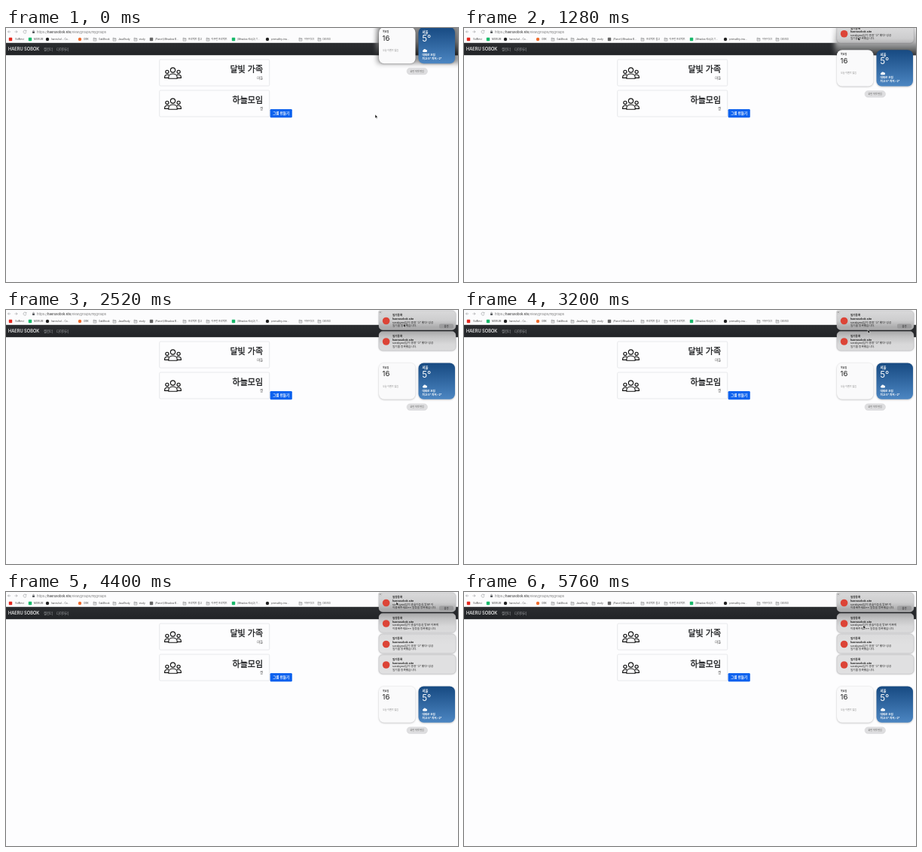
Write an HTML page that moves like this. It is 600 px wide and 338 px high and loops after 5.8 s.

```html
<!DOCTYPE html>
<html lang="ko">
<head>
<meta charset="utf-8">
<style>
html, body { margin: 0; width: 100%; height: 100%; overflow: hidden; background: #fdfdfe; }
svg { display: block; width: 100%; height: 100%; font-family: Inter, "Noto Sans CJK KR", "Noto Sans CJK", sans-serif; }
text { white-space: pre; }
</style>
</head>
<body>
<svg id="stage" viewBox="0 0 600 338" xmlns="http://www.w3.org/2000/svg">
  <defs>
    <linearGradient id="sky" x2="0" y2="1">
      <stop stop-color="#174a82"/><stop offset="1" stop-color="#4c86c2"/>
    </linearGradient>
    <linearGradient id="nav" x2="0" y2="1">
      <stop stop-color="#2b2d30"/><stop offset="1" stop-color="#222427"/>
    </linearGradient>
    <!-- what the frosted glass lets through, by height on the page -->
    <linearGradient id="glass" gradientUnits="userSpaceOnUse" x1="0" y1="0" x2="0" y2="70">
      <stop stop-color="#dadadb"/><stop offset=".2" stop-color="#cdcdce"/>
      <stop offset=".32" stop-color="#adadae"/><stop offset=".41" stop-color="#a8a8a9"/>
      <stop offset=".51" stop-color="#c3c3c4"/><stop offset=".65" stop-color="#d8d8d9"/>
      <stop offset="1" stop-color="#e0e0e1"/>
    </linearGradient>
    <!-- blurred column behind the panel while it moves -->
    <linearGradient id="veil" gradientUnits="userSpaceOnUse" x1="0" y1="0" x2="0" y2="36">
      <stop stop-color="#e6e6e7"/><stop offset=".5" stop-color="#b4b4b5"/>
      <stop offset=".75" stop-color="#777879"/><stop offset="1" stop-color="#37383a"/>
    </linearGradient>
    <filter id="soft" x="-30%" y="-30%" width="160%" height="160%"><feGaussianBlur stdDeviation="3.5"/></filter>
    <filter id="sides" x="-20%" y="0" width="140%" height="100%"><feGaussianBlur stdDeviation="3 0"/></filter>
    <filter id="faint" x="-20%" y="-20%" width="140%" height="140%"><feGaussianBlur stdDeviation="1.2"/></filter>
    <g id="people" fill="none" stroke="#111" stroke-width="1.15" stroke-linejoin="round" stroke-linecap="round">
      <circle cx="11.5" cy="4" r="3.1"/>
      <path d="M5.8 15.2v-1.7c0-6 11.4-6 11.4 0v1.7z"/>
      <circle cx="3.9" cy="6.3" r="2.1"/><circle cx="19.1" cy="6.3" r="2.1"/>
      <path d="M5.6 14.4H.6v-1.2c0-2.7 3-3.8 5.4-2.8M17.4 14.4h5v-1.2c0-2.7-3-3.8-5.4-2.8"/>
    </g>
  </defs>
</svg>
<script>
const LOOP = 5800;
const stage = document.getElementById('stage');

function add(parent, tag, attrs = {}, content) {
  const el = document.createElementNS('http://www.w3.org/2000/svg', tag);
  for (const key in attrs) el.setAttribute(key, attrs[key]);
  if (content !== undefined) el.textContent = content;
  parent.append(el);
  return el;
}
const rect = (p, x, y, width, height, fill, more) => add(p, 'rect', { x, y, width, height, fill, ...more });
const text = (p, x, y, size, str, fill = '#222', more) =>
  add(p, 'text', { x, y, 'font-size': size, fill, ...more }, str);
const bold = { 'font-weight': 700 }, end = { 'text-anchor': 'end' }, middle = { 'text-anchor': 'middle' };
const move = (el, x, y) => el.setAttribute('transform', `translate(${x} ${y})`);

function buildBrowser() {
  rect(stage, 0, 0, 600, 20, '#fcfcfd');
  add(stage, 'path', {
    d: 'M6.2 5H2.6M4 3.4 2.5 5 4 6.6M11.5 5H15M13.6 3.4 15.1 5l-1.5 1.6M26.6 3.8A2 2 0 1 0 27 5.5M27 2.9v1.3h-1.3',
    fill: 'none', stroke: '#8b8d91', 'stroke-width': .55
  });
  rect(stage, 35, 4.5, 3, 2.5, '#55585c', { rx: .4 });
  add(stage, 'path', { d: 'M35.7 4.6v-.7a.8.8 0 0 1 1.6 0v.7', fill: 'none', stroke: '#55585c', 'stroke-width': .45 });
  const url = text(stage, 41, 6.6, 4.15, '', '#777');
  add(url, 'tspan', {}, 'https://');
  add(url, 'tspan', { fill: '#222' }, 'haerusobok.site');
  add(url, 'tspan', {}, '/view/groups/mygroups');

  // icon x, label x, label, icon colour (none: folder), round icon
  const bookmarks = [
    [6, 12, 'VidNest', '#e5281f'], [32, 37, 'MORUM', '#19b96b'],
    [55, 60, 'haneulsol - Co...', '#222', 1], [98, 103, 'OBK', '#ef6c2e', 1],
    [118, 123, 'OakBrook'], [144, 149, 'JavaStudy'], [172, 176.5, 'study'],
    [193, 198, '[Parcel] Meadow B...', '#666'], [237, 242, '프로젝트 참고'],
    [268, 272.5, '아무런 프로젝트'], [302, 307, '[Meadow Kit][2] T...', '#19b96b'],
    [347, 352, 'pinevalley-tea...', '#222', 1], [391, 396, '아무거나1'], [416, 420.5, 'DEV03']
  ];
  for (const [ix, tx, label, color, round] of bookmarks) {
    if (!color) add(stage, 'path', {
      d: `M${ix - 2} 13h1.6l.6.7h1.8v3.5h-4zM${ix - 2} 14.5h4`,
      fill: '#e4e5e7', stroke: '#777', 'stroke-width': .4
    });
    else rect(stage, ix - 2.2, 12.8, 4.4, 4.4, color, { rx: round ? 2.2 : .7 });
    text(stage, tx, 16.2, 3.15, label, '#444');
  }
}

function buildPage() {
  rect(stage, 0, 19.8, 600, 16.4, 'url(#nav)');
  text(stage, 3, 30.2, 5.7, 'HAERU SOBOK', '#fff', { 'font-weight': 500 });
  text(stage, 50, 29.8, 4.4, '캘린더', '#a3a5a8');
  text(stage, 67, 29.8, 4.4, '다이어리', '#a3a5a8');

  [[42, '달빛 가족', '마들'], [83, '하늘모임', '짱']].forEach(([y, title, sub]) => {
    rect(stage, 203.7, y, 146, 35, '#fdfdfe', { rx: 1.4, stroke: '#d9dadd', 'stroke-width': .6 });
    add(stage, 'use', { href: '#people', transform: `translate(210 ${y + 10})` });
    text(stage, 341, y + 17.2, 11, title, '#1c1e20', { ...end, stroke: '#1c1e20', 'stroke-width': .3 });
    text(stage, 341, y + 25.8, 4.2, sub, '#444', end);
  });
  rect(stage, 350.6, 107.9, 29.2, 11.4, '#0d62ee', { rx: 1.4 });
  text(stage, 365.2, 115.2, 4.5, '그룹 만들기', '#fff', { ...middle, ...bold });
}

function buildWidgets() {
  const g = add(stage, 'g');
  const shade = rect(g, 493, -8, 112, 56, '#000', { filter: 'url(#soft)' });
  for (const x of [495, 547.5]) rect(g, x, .5, 48.5, 48.5, '#000', { rx: 7, opacity: .25, filter: 'url(#faint)' });
  rect(g, 495, 0, 48.5, 48.3, '#fafafb', { rx: 7 });
  text(g, 500, 7.2, 3, '목요일', '#333', bold);
  text(g, 499.6, 17.6, 9.6, '16', '#222');
  text(g, 500, 32.2, 3, '오늘 이벤트 없음', '#888');

  rect(g, 547.5, 0, 48.5, 48.3, 'url(#sky)', { rx: 7 });
  text(g, 552.5, 7.8, 4.4, '서울', '#fff', bold);
  text(g, 552.3, 19.2, 11.5, '5°', '#fff');
  add(g, 'path', { d: 'M554 33a1.4 1.4 0 0 1 .1-2.7 1.9 1.9 0 0 1 3.4-.3 1.5 1.5 0 0 1 .1 3z', fill: '#fff' });
  text(g, 552.5, 38.2, 3.6, '대체로 흐림', '#fff', bold);
  text(g, 552.5, 43.1, 3.6, '최고:5° 최저:-2°', '#fff', bold);

  rect(g, 532, 54.3, 27.5, 8.6, '#dedee0', { rx: 4.3, stroke: '#cfcfd1', 'stroke-width': .4 });
  text(g, 545.7, 59.7, 3, '화면 위젯 편집', '#666', middle);
  return { g, shade };
}

function buildNotice(title, line1, line2) {
  const g = add(stage, 'g');
  const shadow = rect(g, 0, 0, 102, 25.8, '#000', { rx: 5, opacity: .3, filter: 'url(#faint)' });
  const plate = rect(g, 0, 0, 102, 25.5, 'url(#glass)', { rx: 5, stroke: '#b9b9ba', 'stroke-width': .4 });
  const body = add(g, 'g');
  add(body, 'circle', { cx: 9.6, cy: 13.5, r: 4.8, fill: '#dc4437' });
  text(body, 18, 7.4, 3.6, title, '#222', bold);
  text(body, 18, 12, 3.55, 'haerusobok.site', '#222', bold);
  text(body, 18, 16.6, 3.65, line1);
  text(body, 18, 21, 3.65, line2);
  return (x, y) => {
    for (const el of [shadow, plate]) {
      el.setAttribute('x', x);
      el.setAttribute('y', y);
    }
    move(body, x, y);
  };
}

function buildHover() {
  const g = add(stage, 'g');
  rect(g, 575, 18.4, 19, 6.2, '#8f8f91', { rx: 1.8, opacity: .65 });
  text(g, 584.5, 22.7, 3.3, '옵션', '#222', middle);
  add(g, 'circle', { cx: 496.7, cy: 3, r: 2.3, fill: '#dadadb', stroke: '#aaa', 'stroke-width': .3 });
  add(g, 'path', { d: 'm495.9 2.2 1.6 1.6m0-1.6-1.6 1.6', stroke: '#444', 'stroke-width': .45 });
  return g;
}

buildBrowser();
buildPage();
const veil = rect(stage, 492, 0, 130, 36.2, 'url(#veil)', { filter: 'url(#sides)' });
const widgets = buildWidgets();
const diary = ['일기등록', "sorabyeol님이 콩콩 '산' 했다! 성공", '일기를 등록했습니다.'];
const plan = '이용해주세요~~ 일정을 등록했습니다.';
const notices = [
  buildNotice(...diary),
  buildNotice(...diary),
  buildNotice('일정등록', 'sorabyeol님이 솔숲이음실 방문! 이쁘게', plan),
  buildNotice('일정등록', 'sorabyeol님이 솔숲이음실 방문! 이', plan)
];
const hover = buildHover();
const cursor = add(stage, 'path', {
  d: 'M0 0v5l1.2-1 .8 1.8.9-.4-.8-1.7h1.6z',
  fill: '#111', stroke: '#fff', 'stroke-width': .5, 'stroke-linejoin': 'round'
});

// Each track: [time, value] points, every step slowing towards its end.
const tracks = {
  widgetY: [[1200, -1], [1280, 29], [1560, 70.5], [3640, 70.5], [3840, 98], [3920, 110], [4100, 125.5]],
  listY: [[1200, -35], [1280, -6], [1560, 28.5], [3640, 28.5], [3860, 56], [3920, 61.5], [4120, 83.5]],
  thirdX: [[3640, 110], [3860, 0]],
  fourthX: [[3880, 110], [3920, 88], [4120, 0]],
  veil: [[1280, 1], [1560, 0], [3640, 0], [3860, .8], [3920, .8], [4120, 0]],
  cursorX: [[700, 490], [1160, 523], [1400, 523], [1700, 527], [2500, 527], [3100, 536], [3640, 536], [3900, 511], [3960, 511], [4360, 518], [4900, 518], [5500, 530]],
  cursorY: [[700, 115], [1160, 12], [1400, 12], [1700, 17.5], [2500, 17.5], [3100, 26], [3640, 26], [3900, 89.5], [3960, 89.5], [4360, 13], [4900, 13], [5500, 44]]
};
function at(name, t) {
  const keys = tracks[name];
  const i = keys.findIndex(k => k[0] > t);
  if (i === 0) return keys[0][1];
  if (i < 0) return keys[keys.length - 1][1];
  const [t0, a] = keys[i - 1], [t1, b] = keys[i];
  const u = (t - t0) / (t1 - t0);
  return a + (b - a) * (1 - (1 - u) ** 2);
}

function draw(now) {
  const t = now % LOOP;
  const top = at('widgetY', t), list = at('listY', t);
  move(widgets.g, 0, top);
  widgets.shade.setAttribute('opacity', .4 * Math.max(0, Math.min(1, (24 - top) / 25)));
  veil.setAttribute('opacity', at('veil', t));
  notices[0](495, list);
  notices[1](495, list - 27.5);
  notices[2](495 + at('thirdX', t), Math.max(1, list - 55));
  notices[3](495 + at('fourthX', t), 1);
  hover.setAttribute('visibility', (t >= 1560 && t < 3640) || t >= 4160 ? 'visible' : 'hidden');
  move(cursor, at('cursorX', t), at('cursorY', t));
}

const start = performance.now();
function tick() {
  draw(performance.now() - start);
  requestAnimationFrame(tick);
}
tick();
</script>
</body>
</html>
```
